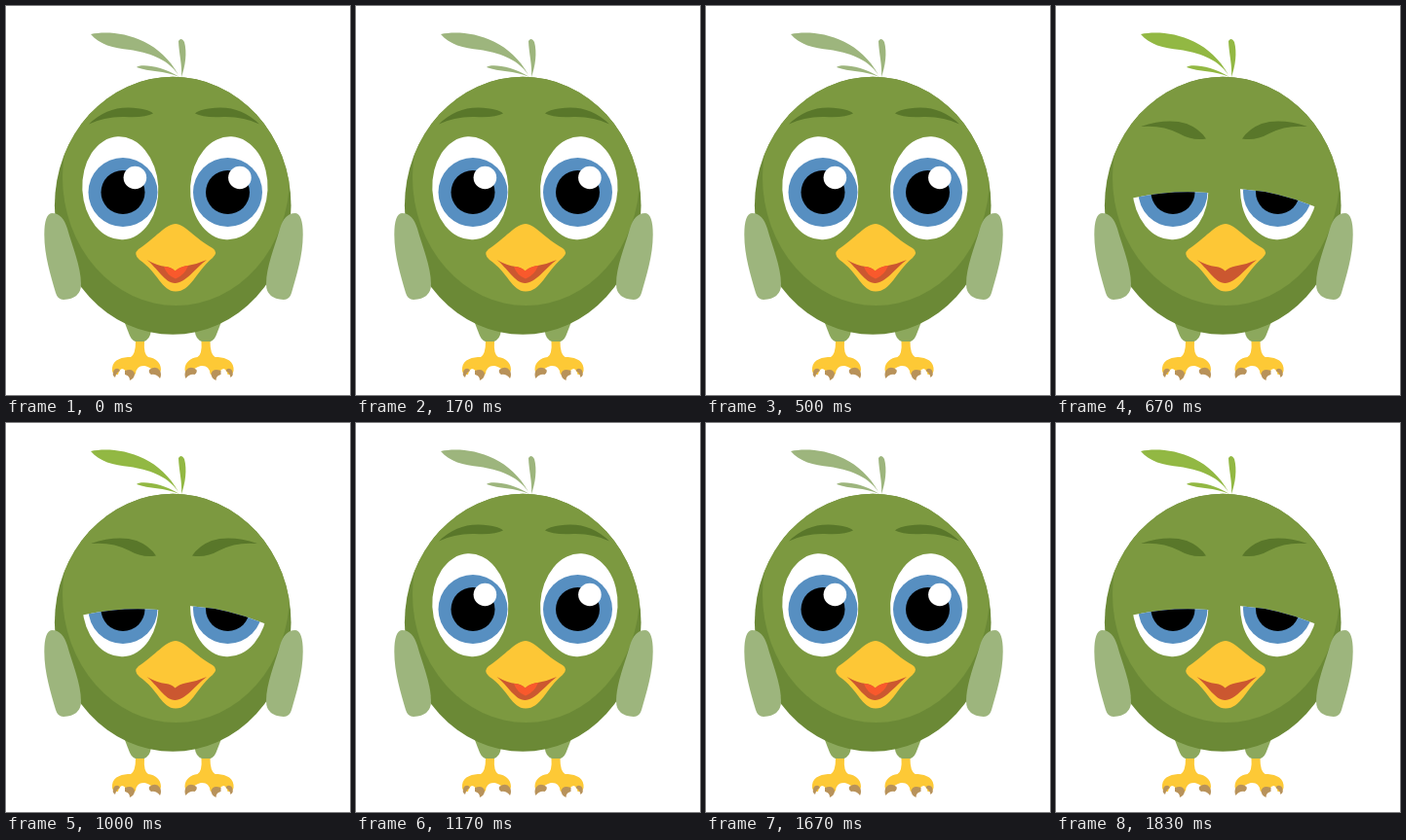
An HTML page that plays this animation: 353 by 400 pixels, repeating every 2 s.

```html
<!DOCTYPE html>
<html lang="en">
<head>
<meta charset="utf-8">
<title>Green bird</title>
<style>
  html, body { margin: 0; width: 100%; height: 100%; overflow: hidden; background: #fff; }
  svg { display: block; width: 100%; height: 100%; }
  .sage { fill: #9db57d; }
  .brow { fill: #59772a; }
  .crest { fill: #9db57d; }
  .sleepy .crest { fill: #92b843; }
  .sleepy .awake, svg:not(.sleepy) .drowsy { display: none; }
  .sleepy .eyeL { clip-path: url(#lidL); }
  .sleepy .eyeR { clip-path: url(#lidR); }
</style>
</head>
<body>
<svg id="bird" viewBox="0 0 353 400">
  <defs>
    <clipPath id="bodyClip"><ellipse cx="171.200" cy="205.300" rx="121.300" ry="132.500"/></clipPath>
    <clipPath id="lidL"><path d="M70 198.500L81 197Q118 189 156 192L170 193V250H70Z"/></clipPath>
    <clipPath id="lidR"><path d="M180 187L192 188.500Q228 191 265 206L280 212V250H180Z"/></clipPath>

    <g id="leg">
      <path fill="#8ca85d" d="M122 326Q125 334 127 339Q130 346 137 346Q146 345 148 338L150 328Z"/>
      <path fill="#fdc936" d="M133 345H142Q141 358 146 361C153 362 159 366 159 374Q158 380 152 377C149 372 145 370 141 370Q134 370 133 378Q130 383 123 379Q123 373 119 373Q116 374 115 379Q108 380 109 372C110 363 120 361 128 361Q133 358 133 345Z"/>
      <path fill="#b8925a" d="M111 374Q115 371 117 375Q113 377 112 382Q108 379 111 374ZM122 375Q130 372 132 378Q132 383 127 385Q127 380 122 379ZM147 374Q154 369 158 375Q160 379 158 383Q154 378 149 379Q146 377 147 374Z"/>
    </g>
    <path id="wing" class="sage" d="M47 213C55 213 60 219 63 229C68 247 77 268 77 286Q77 301 59 302Q53 302 51 295C46 277 39.300 257 39.300 235Q39.300 214 47 213Z"/>
    <path id="calmBrow" d="M85 121.500Q103 104 126 104.500Q146 105.500 151 110.500Q143 115 122 114Q101 113.500 85 121.500Z"/>
    <path id="tiredBrow" d="M87 124Q114 115 134 121Q147 126 154 136.500Q140 139 126 131Q109 122 87 124Z"/>
    <g id="pupil">
      <circle r="35.500" fill="#578fc1"/>
      <circle r="22.500"/>
      <circle cx="12.400" cy="-15" r="11.800" fill="#fff"/>
    </g>
  </defs>

  <g class="crest">
    <path d="M87 29C110 24 155 30 177 71C165 53 145 48 127 45C110 43 96 40 87 29Z"/>
    <path d="M134 63C137 59 160 61 178 73C162 66 147 68 134 63Z"/>
    <path d="M177 36Q180 31.500 183 37C186 48 184 62 180 73C181 60 177.500 50 177 36Z"/>
  </g>

  <use href="#leg"/>
  <use href="#leg" transform="matrix(-1 0 0 1 342.500 0)"/>

  <g clip-path="url(#bodyClip)">
    <path fill="#6b8936" d="M0 0H353V400H0Z"/>
    <ellipse cx="174.500" cy="176" rx="116.500" ry="132" fill="#7c9940"/>
  </g>

  <use href="#wing"/>
  <use href="#wing" transform="matrix(-1 0 0 1 344 0)"/>

  <g class="brow awake">
    <use href="#calmBrow"/>
    <use href="#calmBrow" transform="matrix(-1 0 0 1 345 0)"/>
  </g>
  <g class="brow drowsy">
    <use href="#tiredBrow"/>
    <use href="#tiredBrow" transform="matrix(-1 0 0 1 345 0)"/>
  </g>

  <g class="eyeL">
    <ellipse cx="117.300" cy="187.300" rx="39" ry="53" fill="#fff" transform="rotate(-3 117.300 187.300)"/>
    <use href="#pupil" x="120" y="191.500"/>
  </g>
  <g class="eyeR">
    <ellipse cx="228.800" cy="187.300" rx="39.700" ry="53" fill="#fff" transform="rotate(3 228.800 187.300)"/>
    <use href="#pupil" x="227.500" y="191.500"/>
  </g>

  <path fill="#fdc736" d="M174 224C183 224 194 239 212 249Q218 253 212 259C194 274 190 293.500 174 293.500C160 293.500 156 274 137 261Q130 255 136 250C153 239 164 224 174 224Z"/>
  <path fill="#cb5730" d="M144.500 261Q155 267 164 268Q170 268.500 173.500 272.500Q178 268.500 184 267.500Q195 266 206 261C194 270 184 285 173.500 285C163 285 155 269 144.500 261Z"/>
  <path class="awake" fill="#f9592c" d="M162 268Q169 268 173.500 272.500Q179 267.500 187 267Q183 277 174 280.500Q165 277 162 268Z"/>
</svg>
<script>
  const bird = document.getElementById('bird');
  const LOOP = 2000;

  function draw(now) {
    const t = now % LOOP;
    const sleepy = (t >= 670 && t < 1170) || t >= 1830;
    bird.classList.toggle('sleepy', sleepy);
    requestAnimationFrame(draw);
  }
  draw(0);
</script>
</body>
</html>
```
